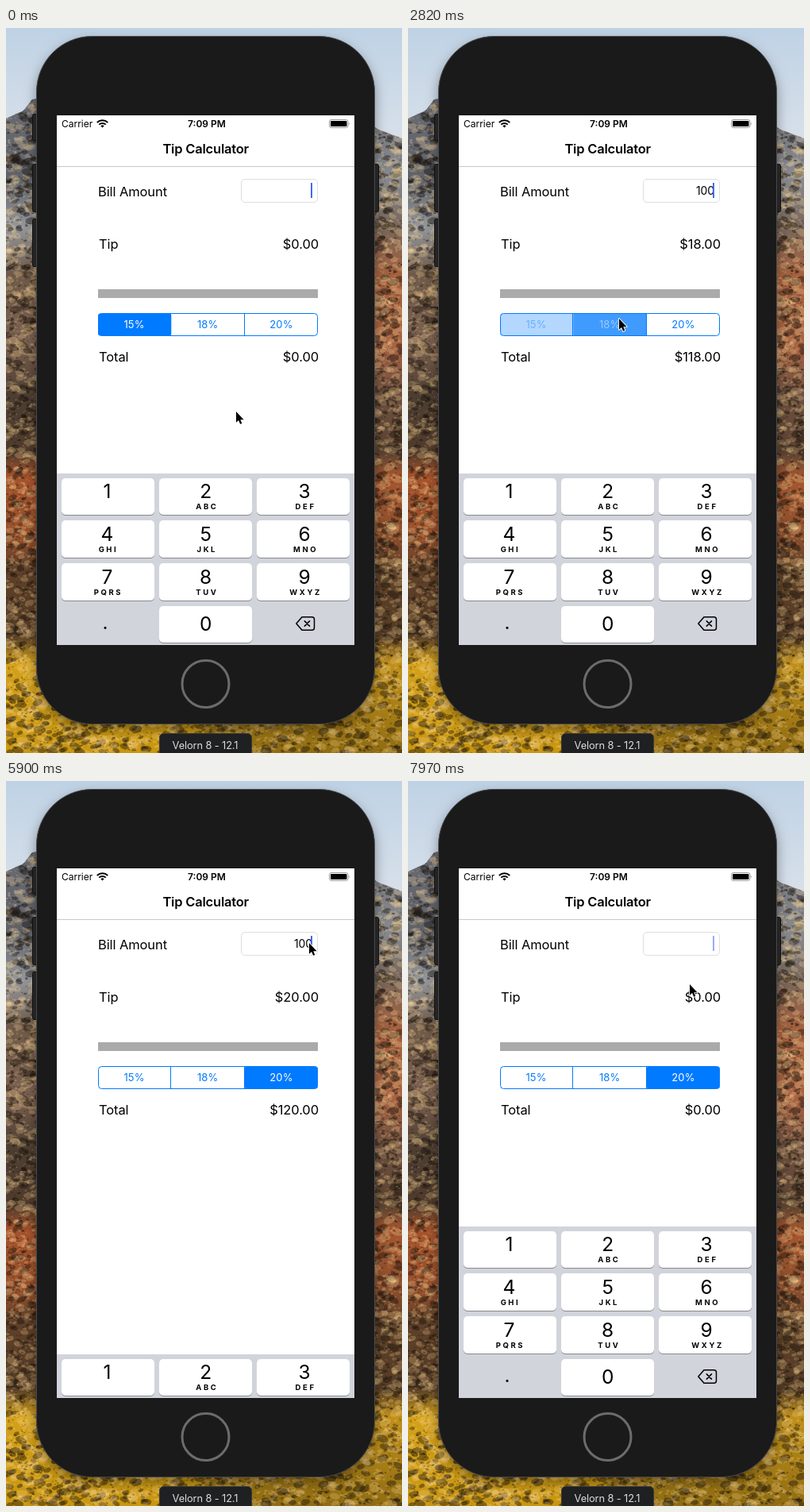
Recreate the animation shown at these times as an HTML page with a canvas. Size 499 by 913 pixels, loop 8000 ms.

```html
<!DOCTYPE html>
<html lang="en">
<head>
<meta charset="utf-8">
<title>Tip Calculator</title>
<style>
html, body { margin: 0; width: 100%; height: 100%; overflow: hidden; }
canvas, #ui { position: absolute; left: 0; top: 0; width: 100%; height: 100%; }
text { font: 16.5px Inter, Roboto, sans-serif; letter-spacing: -.1px; white-space: pre; }
.mid { text-anchor: middle; }
.end { text-anchor: end; }
.title { font-weight: 600; letter-spacing: -.2px; }
.status { font-size: 12px; letter-spacing: 0; }
.seg { font-size: 13px; letter-spacing: .1px; }
.digit { font-size: 24.5px; letter-spacing: 0; }
.abc { font-size: 9.5px; font-weight: 700; letter-spacing: 2.6px; }
</style>
</head>
<body>
<canvas width="499" height="913"></canvas>
<svg id="ui" viewBox="0 0 499 913" preserveAspectRatio="none">
  <circle cx="251.5" cy="826" r="29.5" fill="none" stroke="#6c6c6c" stroke-width="3"/>
  <rect x="193.5" y="888.5" width="116" height="40" rx="5" fill="#1f2022" stroke="#37393b"/>
  <text class="mid" x="251" y="907.5" fill="#dcdcdc" style="font-size:12.8px">Velorn 8 - 12.1</text>
  <svg x="64" y="110" width="375" height="667" viewBox="64 110 375 667">
    <rect x="64" y="110" width="375" height="667" fill="#fff"/>
    <path d="M64 174.5H439" stroke="#c8c8ce"/>
    <text class="status" x="70" y="124.5">Carrier</text>
    <g fill="none" stroke="#000" stroke-width="2">
      <path d="M114.8 119a9.5 9.5 0 0 1 13.4 0M117.3 121.6a6 6 0 0 1 8.4 0"/>
      <path d="M121.5 125.6l-2.1-2.2a3 3 0 0 1 4.2 0z" fill="#000" stroke="none"/>
    </g>
    <text class="status mid" x="253" y="124.5" style="font-weight:600">7:09 PM</text>
    <rect x="407.5" y="115.5" width="23.5" height="10" rx="2.5" fill="none" stroke="#999"/>
    <rect x="409" y="117" width="20.5" height="7" rx="1"/>
    <path d="M432.3 118.8q1.6 1.7 0 3.4z" fill="#888"/>
    <text class="title mid" x="251.7" y="158">Tip Calculator</text>
    <text x="116" y="211.5">Bill Amount</text>
    <text x="117" y="277.5">Tip</text>
    <text x="117" y="419.5">Total</text>
    <rect x="296.5" y="190.5" width="96" height="29" rx="4.5" fill="#fff" stroke="#dedede"/>
    <text id="bill" class="end" x="386" y="210" style="font-size:14px"></text>
    <rect id="caret" x="384" y="195" width="2" height="19" fill="#426bf2"/>
    <text id="tip" class="end" x="394" y="277.5"></text>
    <text id="total" class="end" x="394" y="419.5"></text>
    <rect x="116" y="329" width="277" height="11" fill="#aaa"/>
    <g id="segments"></g>
    <g id="pad"><rect x="64" y="561" width="375" height="217" fill="#d1d4db"/></g>
  </svg>
  <path id="cursor" d="M0 0V13.8L3.1 11 5.1 15.8 7.3 14.9 5.3 10.2H9.6Z" stroke="#fff" stroke-width="1.8" paint-order="stroke" stroke-linejoin="round"/>
</svg>
<script>
const $ = id => document.getElementById(id);
const add = (id, html) => $(id).insertAdjacentHTML('beforeend', html);

// ---- wallpaper and phone body, drawn once ----
const c = document.querySelector('canvas').getContext('2d');
let seed = 7;
const rnd = () => (seed = seed * 16807 % 2147483647) / 2147483647;

// Vertical blend through [y, color] stops.
function blend(x, w, stops) {
  const g = c.createLinearGradient(0, 0, 0, 913);
  for (const [y, color] of stops) g.addColorStop(y / 913, color);
  c.fillStyle = g;
  c.fillRect(x, 0, w, 913);
}

function slab(x, y, w, h, r, fill, line) {
  c.beginPath();
  c.roundRect(x, y, w, h, r);
  c.fillStyle = fill;
  c.fill();
  c.shadowColor = 'transparent';
  c.strokeStyle = line;
  c.stroke();
}

// Height, left tone, right tone: rock, scrub, red bushes, yellow trees.
const LAND = [
  [90, '#686b73', '#72757c'], [190, '#5f626a', '#888a8f'], [250, '#94979c', '#77665a'],
  [310, '#6f5a49', '#a4613f'], [400, '#7a6050', '#a86343'], [460, '#4d3e32', '#6e5140'],
  [535, '#503b2c', '#5b4331'], [565, '#a5532c', '#a45730'], [640, '#97502c', '#8c4f2d'],
  [680, '#5f4029', '#604229'], [765, '#553c26', '#553c26'], [800, '#d3a11a', '#c0901a'],
  [913, '#c8960f', '#8f6c12']];

blend(0, 499, [[0, '#bfd2e5'], [130, '#d6dfe9']]);
c.save();
c.clip(new Path2D('M0 114L22 104 33 90 60 84 440 110 470 128 499 139V913H0Z'));
for (const side of [0, 1]) blend(side * 250, 250, LAND.map(row => [row[0], row[1 + side]]));
for (let i = 0; i < 24000; i++) {
  const size = 1 + 7 * rnd() ** 4;
  c.fillStyle = rnd() < .45 ? 'rgba(25,18,10,.42)' : 'rgba(255,215,150,.24)';
  c.beginPath();
  c.ellipse(rnd() * 499, 85 + rnd() * 828, size, size * .6, rnd() - .5, 0, 7);
  c.fill();
}
c.restore();

for (const [x, y, h] of [[33, 108, 34], [33, 171, 61], [33, 240, 61], [462, 171, 61]])
  slab(x + .5, y + .5, 7, h - 1, 2, '#2b2b2b', '#111');
c.shadowColor = 'rgba(0,0,0,.4)';
c.shadowBlur = 16;
c.shadowOffsetY = 7;
slab(38.5, 10.5, 426, 866, 70, '#1a1a1a', '#48494b');

// ---- segments and keypad ----
const RATES = [15, 18, 20];
RATES.forEach((rate, i) => add('segments',
  `<rect id="seg${i}" x="${116 + 92.3 * i}" y="359.5" width="92.3" height="28" rx="${i == 1 ? 0 : 3}" fill="#007aff"/>
  <text id="rate${i}" class="seg mid" x="${161.5 + 92.7 * i}" y="378">${rate}%</text>`));
add('segments', `<path d="M207.5 360V387M300.5 360V387" stroke="#007aff"/>
  <rect x="116.5" y="359.5" width="276" height="28" rx="4" fill="none" stroke="#007aff"/>`);

function key(label, col, row, letters = '') {
  const x = 70 + 123 * col, mid = 127.4 + 124.3 * col;
  const top = Math.round(566.6 + 53.7 * row), h = Math.round(613.3 + 53.7 * row) - top;
  const base = label ? 592 + 54 * row : 759;
  add('pad', `<rect x="${x}" y="${top + 1}" width="117" height="${h}" rx="5" fill="#888a8e"/>
    <rect id="key${label}" x="${x}" y="${top}" width="117" height="${h}" rx="5"/>
    <text class="digit mid" x="${mid}" y="${base}">${label}</text>
    <text class="abc mid" x="${mid + 1.6}" y="${base + 14}">${letters}</text>`);
}
',ABC,DEF,GHI,JKL,MNO,PQRS,TUV,WXYZ'.split(',').forEach((s, i) => key(i + 1, i % 3, i / 3 | 0, s));
key(0, 1, 3);
add('pad', `<text class="digit mid" x="125" y="756.5">.</text>
  <g stroke-width="1.5" stroke-linejoin="round" stroke-linecap="round">
  <path id="del" d="M373 741.8H385.5a3 3 0 0 1 3 3V755.3a3 3 0 0 1-3 3H373L365.8 750Z" stroke="#000"/>
  <path id="cross" d="M376.3 746.9l6.2 6.2M382.5 746.9l-6.2 6.2"/></g>`);

const LOOP = 8000, TICK = 147.6, PAD_H = 216, PAD_TIME = 1.92;
const PAD_HIDE = 32.5, PAD_SHOW = 39.37;
const KEYS = [[4, '1'], [9, '0'], [10, '0'], [48, 'del'], [49, 'del'], [50, 'del']];
const PICKS = [[0, 0], [19, 1], [25, 2]];
// Cursor stops: arrive, leave, x, y.
const STOPS = [
  [0, 0, 290, 483], [4, 5, 136, 592], [8, 12, 249, 768], [18, 19, 266, 366],
  [20, 20, 314, 367], [22, 26, 338, 368], [29, 29, 305, 725], [32, 34, 307, 465],
  [38, 40, 382, 204], [45, 50, 372, 731], [52, 52, 299, 470], [54, 54, 355, 256]];

const clamp = p => Math.max(0, Math.min(1, p));
const smooth = p => (p = clamp(p)) * p * (3 - 2 * p);
const money = n => '$' + n.toFixed(2);

function cursorAt(k) {
  const i = STOPS.findLastIndex(s => s[0] <= k);
  const [, leave, x, y] = STOPS[i], [arrive, , x2, y2] = STOPS[i + 1] || [leave + 1, 0, x, y];
  const p = smooth((k - leave) / (arrive - leave));
  return [x + (x2 - x) * p, y + (y2 - y) * p];
}

function caretAlpha(k, last) {
  if (k > PAD_HIDE && k < PAD_SHOW) return 0;
  const t = (k - last) * TICK % 1000;
  return clamp(t < 850 ? 1 - (t - 500) / 200 : (t - 850) / 150);
}

function drawSegments(k, pick) {
  const [start, chosen] = PICKS[pick];
  const rest = pick ? 1 - clamp((k - start + 1) / 2) : 0;
  RATES.forEach((_, i) => {
    const a = i == chosen ? 1 - rest ** 2 : i == chosen - 1 ? rest ** 1.75 : 0;
    const white = a % 1 ? .27 + .45 * a : a;
    $('seg' + i).setAttribute('opacity', a);
    $('rate' + i).setAttribute('fill', `rgb(${255 * white},${122 + 133 * white},255)`);
  });
}

function draw(now) {
  const k = Math.floor((now % LOOP + 15) / TICK);
  const typed = KEYS.filter(([at]) => at <= k);
  const bill = typed.reduce((s, [, name]) => name == 'del' ? s.slice(0, -1) : s + name, '');
  const [last, name] = typed.at(-1) || [0, ''], down = last == k ? name : '';
  const pick = PICKS.findLastIndex(p => p[0] <= k), tip = bill * RATES[pick] / 100;

  $('bill').textContent = bill;
  $('tip').textContent = money(tip);
  $('total').textContent = money(+bill + tip);
  $('caret').setAttribute('opacity', caretAlpha(k, k > PAD_SHOW ? Math.max(last, Math.ceil(PAD_SHOW)) : last));
  drawSegments(k, pick);
  for (let i = 0; i < 10; i++) $('key' + i).setAttribute('fill', down === '' + i ? '#b5b9c2' : '#fff');
  $('del').setAttribute('fill', down == 'del' ? '#000' : 'none');
  $('cross').setAttribute('stroke', down == 'del' ? '#fff' : '#000');
  const hidden = smooth((k - PAD_HIDE) / PAD_TIME) - smooth((k - PAD_SHOW) / PAD_TIME);
  $('pad').setAttribute('transform', `translate(0 ${Math.round(PAD_H * hidden)})`);
  $('cursor').setAttribute('transform', `translate(${cursorAt(k)})`);
  requestAnimationFrame(draw);
}
requestAnimationFrame(draw);
</script>
</body>
</html>
```
